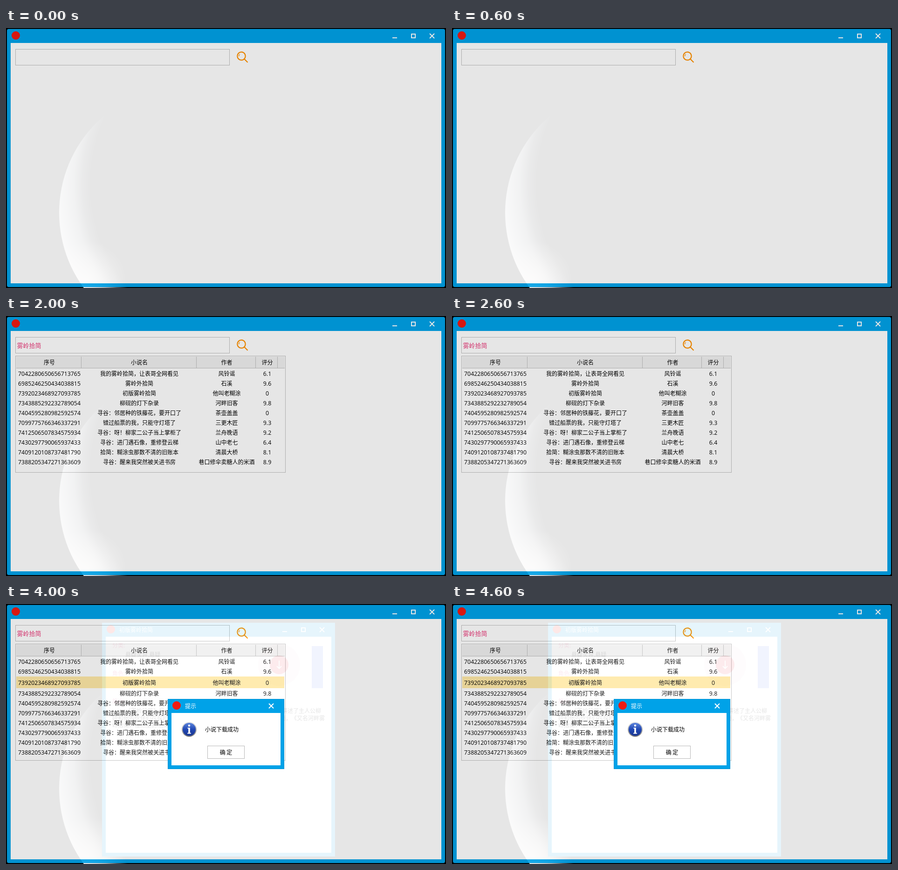
Animation, 944 px wide and 556 px high, one loop 5000 ms. Source, as an HTML page:

```html
<!DOCTYPE html>
<html lang="zh-CN">
<head>
<meta charset="utf-8">
<title>小说下载</title>
<style>
html, body { margin: 0; width: 100%; height: 100%; overflow: hidden; background: #000; }
svg { display: block; }
text {
  font: 12px "Noto Sans CJK SC", "Noto Sans CJK", sans-serif;
  text-spacing-trim: space-all;
  white-space: pre;
}
text.num { font: 12.33px "Open Sans", "Noto Sans", sans-serif; }
</style>
</head>
<body>
<svg id="stage" width="944" height="556" viewBox="0 0 944 556">
  <defs>
    <radialGradient id="moonlight" gradientUnits="userSpaceOnUse" cx="536" cy="334" r="432">
      <stop offset=".815" stop-color="#000"/>
      <stop offset=".86" stop-color="#2c2f33"/>
      <stop offset=".905" stop-color="#7c8085"/>
      <stop offset=".95" stop-color="#a6aaaf"/>
      <stop offset="1" stop-color="#d0d2d4"/>
    </radialGradient>
    <radialGradient id="warm" gradientUnits="userSpaceOnUse" cx="176" cy="540" r="85">
      <stop offset="0" stop-color="#fff4ec" stop-opacity=".65"/>
      <stop offset="1" stop-color="#fff4ec" stop-opacity="0"/>
    </radialGradient>
    <linearGradient id="steel" x2="0" y2="1">
      <stop offset="0" stop-color="#eee"/>
      <stop offset="1" stop-color="#777"/>
    </linearGradient>
    <linearGradient id="blue" x2="0" y2="1">
      <stop offset="0" stop-color="#5f86dc"/>
      <stop offset=".5" stop-color="#2148b4"/>
      <stop offset="1" stop-color="#1a3690"/>
    </linearGradient>
  </defs>
  <circle cx="385" cy="395" r="271" fill="url(#moonlight)"/>
  <circle cx="385" cy="395" r="271" fill="url(#warm)"/>
  <g id="scene"></g>
</svg>
<script>
const SKY = '#00a2e8', PINK = '#ea3778', LINE = '#c0c0c0';
const BOOK = '雾岭拾简', PICK = 2;
const COLUMNS = [[93, '序号'], [286, '小说名'], [473.5, '作者'], [560.5, '评分']];
const BOOKS = [
  ['7042280650656713765', '我的雾岭拾简，让表哥全网看见', '风铃谣', '6.1'],
  ['6985246250434038815', '雾岭外拾简', '石溪', '9.6'],
  ['7392023468927093785', '初版雾岭拾简', '他叫老糊涂', '0'],
  ['7343885292232789054', '柳砚的灯下杂录', '河畔旧客', '9.8'],
  ['7404595280982592574', '寻谷：邻居种的铁藤花，要开口了', '茶壶盖盖', '0'],
  ['7099775766346337291', '错过船票的我，只能守灯塔了', '三更木匠', '9.3'],
  ['7412506507834575934', '寻谷：呀！柳家二公子当上掌柜了', '兰舟晚语', '9.2'],
  ['7430297790065937433', '寻谷：进门遇石像，重修登云梯', '山中老七', '6.4'],
  ['7409120108737481790', '拾简：糊涂虫那数不清的旧账本', '清晨大桥', '8.1'],
  ['7388205347271363609', '寻谷：醒来我突然被关进书房', '巷口修伞卖糖人的米酒', '8.9']
];

const rect = (x, y, w, h, fill, more = '') =>
  `<rect x="${x}" y="${y}" width="${w}" height="${h}" fill="${fill}" ${more}/>`;
const frame = (x, y, w, h, color = LINE) =>
  rect(x + .5, y + .5, w - 1, h - 1, 'none', `stroke="${color}"`);
const circle = (x, y, r, fill) => `<circle cx="${x}" cy="${y}" r="${r}" fill="${fill}"/>`;
const stroke = (d, color, width = 2) =>
  `<path d="${d}" fill="none" stroke="${color}" stroke-width="${width}"/>`;
// y is the vertical middle of the line
const text = (x, y, s, fill = '#000', more = '') =>
  `<text x="${x}" y="${y + 4.5}" fill="${fill}" ${more}>${s}</text>`;
const centered = (x, y, s, more = '') => text(x, y, s, '#000', 'text-anchor="middle" ' + more);

function windowFrame(x, y, w, h, title, { radius = 0, sizable = true, edge = true } = {}) {
  const r = x + w, cy = y + 15;
  return rect(x, y, w, h, SKY, `rx="${radius}"`) +
    (edge ? frame(x, y, w, h, '#0091d2') : '') +
    rect(x + 8, y + 30, w - 16, h - 38, '#fff') +
    circle(x + 19, y + 14, 9, '#f01a12') +
    text(x + 37, y + 15.5, title, '#fff') +
    stroke(`M${r - 33} ${cy - 5}l10 10m0 -10l-10 10`, '#fff') +
    (sizable ? stroke(`M${r - 113} ${cy + 4}h10M${r - 72} ${cy - 4}h8v8h-8z`, '#fff') : '');
}

function table(selected) {
  let y = 113;
  const rows = BOOKS.map((book, i) => {
    const active = selected && i === PICK, h = active ? 26 : 21;
    const cells = book.map((s, c) =>
      centered(COLUMNS[c][0], y + h / 2, s, c % 3 ? '' : 'class="num"')).join('');
    const row = (active ? rect(22, y, 575, 25, '#ffe9a7') : '') + cells;
    y += h;
    return row;
  });
  return rect(22, 87, 576, 24, '#f0f0f0') +
    stroke('M22 111.5H598M161.5 87V111M408.5 87V111M535.5 87V111M582.5 87V111', LINE, 1) +
    frame(20, 85, 580, 250) +
    COLUMNS.map(([x, s]) => centered(x, 99.5, s)).join('') + rows.join('');
}

// The main window is translucent, so whatever lies behind shines through.
function mainWindow(step) {
  return '<g opacity=".9">' +
    windowFrame(2, 2, 940, 552, '', { radius: 4, edge: false }) +
    frame(20, 45, 460, 35) +
    stroke('M511.5 66.5l7 7M513.7 60a8.7 8.7 0 1 1 -17.4 0a8.7 8.7 0 1 1 17.4 0', '#ff9200', 2.2) +
    stroke('M499.7 60.5q0 -3 1.8 -4.5', '#ff9200', 1.2) +
    (step > 0 ? text(23.5, 63, BOOK, PINK, 'style="font-size:13px"') : '') +
    (step > 1 ? table(step > 2) : '') + '</g>';
}

function details(step) {
  return windowFrame(206, 40, 500, 500, BOOKS[PICK][1]) +
    text(228, 88.5, '分类:', PINK) + text(256, 108.5, '悬疑灵异,悬疑') +
    text(228, 148.5, '角色:', PINK) + text(256, 168.5, '柳砚') +
    text(228, 208.5, '简介:', PINK) +
    text(256, 228.5, `《${BOOK}》是一部非常受欢迎的中国小说，由河畔旧客所著，讲述了主人公柳`) +
    text(228, 244, '砚和他的伙伴们在探险和寻谷过程中的一系列冒险故事。初版雾岭拾简，《又名河畔雾') +
    text(228, 259.5, '岭拾简》慢热型的 后期危险绝望逃亡之路精彩不断') +
    circle(586, 130, 45, '#fdeaec') + circle(586, 130, 20, '#ed3b4f') +
    stroke('M586 121v17M581 133l5 5l5 -5', '#fff', 1.8) +
    (step > 3 ? rect(656, 90, 24, 90, '#7392f5') : '');
}

function notice() {
  return windowFrame(347, 203, 250, 150, '提示', { sizable: false }) +
    circle(393, 268, 16, 'url(#steel)') + circle(393, 268, 14, 'url(#blue)') +
    circle(393, 260, 2.3, '#fff') +
    '<path d="M389.5 264.5h5.3v11h2v2h-7.6v-2h2v-9h-1.7z" fill="#fff"/>' +
    text(427, 268.5, '小说下载成功') +
    frame(432, 303, 80, 28, '#b8b8b8') + centered(472, 317.5, '确 定');
}

const scene = document.getElementById('scene');
let shown = -1;

function tick() {
  const step = Math.floor(performance.now() / 1000) % 5;
  if (step !== shown) {
    shown = step;
    const main = mainWindow(step);
    scene.innerHTML = step === 4 ? details(step) + main + notice()
      : step === 3 ? main + details(step) : main;
  }
  requestAnimationFrame(tick);
}
tick();
</script>
</body>
</html>
```
